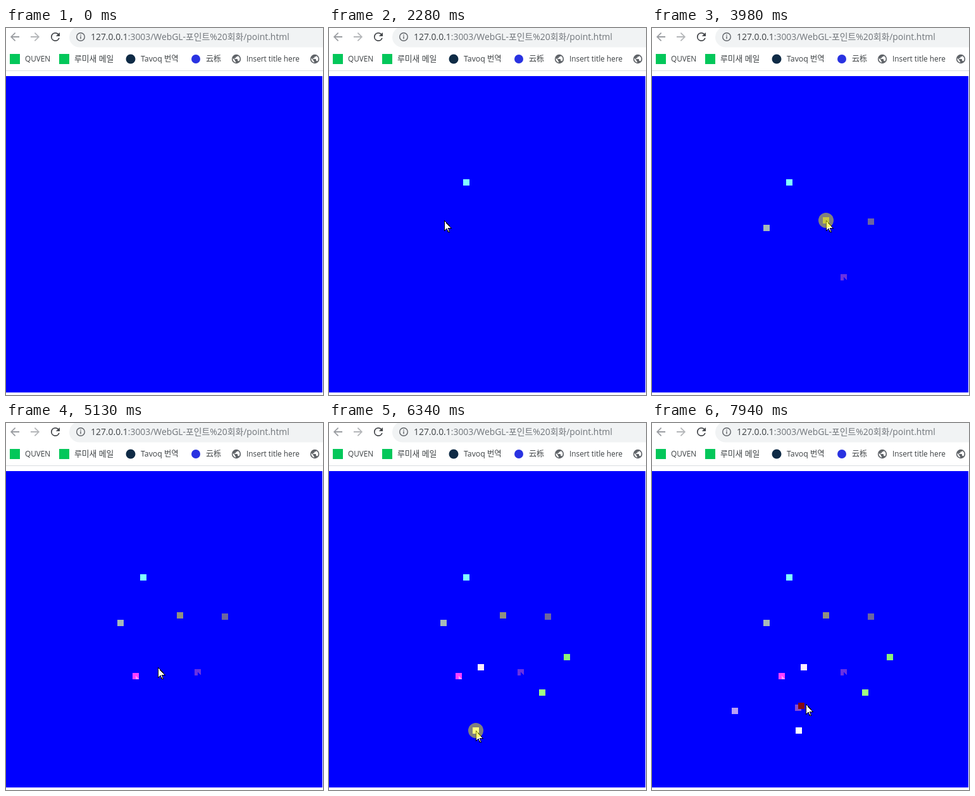
An HTML page for the animation above (8 s loop, 501x580 px).

```html
<!DOCTYPE html>
<html lang="ko">
<head>
<meta charset="utf-8">
<title>WebGL points</title>
<style>
  html, body { margin: 0; width: 100%; height: 100%; overflow: hidden; background: #fff; }
  svg { display: block; }
  text { font-family: "Open Sans", "Noto Sans CJK KR", "Noto Sans CJK", "Noto Sans CJK SC", sans-serif; font-size: 11.8px; fill: #3c4043; }
  .url { font-size: 13.9px; fill: #70757a; }
  .host { fill: #3c4043; }
  .icon { fill: #5f6368; }
  .pixels { shape-rendering: crispEdges; }
</style>
</head>
<body>
<svg width="501" height="580" viewBox="0 0 501 580">
  <defs>
    <path id="arrow" d="M20 11H7.83l5.59-5.59L12 4l-8 8 8 8 1.41-1.41L7.83 13H20z"/>
    <g id="globe">
      <circle class="icon" r="7.2"/>
      <path fill="#fff" d="M-5.4-1.4-2.2 1.800v.8q.2 1.200 1.400 1.400v1.500A5.600 5.600 0 0 1-5.400-1.400zM-2.800-1.400h1.500q.7 0 .7-.7v-1.400H.8Q2-3.600 2.100-5q3.400 1.600 3.400 5 0 2.300-1.500 3.800-.4-1-1.300-1H2V.7Q2 0 1.300 0h-4.100z"/>
    </g>
  </defs>

  <path fill="#f1f3f4" d="M501 0H108Q100 6 100 14.500A16 16 0 0 0 116 30.500H501z"/>
  <use href="#arrow" fill="#9a9da1" transform="translate(3.440 3.440) scale(.88)"/>
  <use href="#arrow" fill="#b4b6b9" transform="translate(56.560 3.440) scale(-.88 .88)"/>
  <path fill="#45484c" transform="translate(67.440 3.440) scale(.88)" d="M17.650 6.350A8 8 0 0 0 12 4a8 8 0 1 0 7.730 10h-2.080A6 6 0 1 1 12 6c1.660 0 3.140.690 4.220 1.780L13 11h7V4z"/>
  <circle cx="118" cy="14" r="6.300" fill="none" stroke="#5f6368" stroke-width="1.400"/>
  <path class="icon" d="M117.300 13h1.400v4.200h-1.400zM117.300 10.500h1.400v1.400h-1.400z"/>
  <text class="url" x="134" y="19"><tspan class="host">127.0.0.1</tspan>:3003/WebGL-포인트%20회화/point.html</text>

  <path fill="#03c75a" d="M6 41h16v16H6zM84 41h16v16H84z"/>
  <circle cx="197" cy="49" r="7.500" fill="#0f2b46"/>
  <circle cx="300" cy="49" r="7" fill="#2932e1"/>
  <use href="#globe" x="364" y="49"/>
  <use href="#globe" x="488" y="49"/>
  <text x="30" y="53">QUVEN</text>
  <text x="108" y="53" style="font-size:12.8px">루미새 메일</text>
  <text x="213" y="53" style="font-size:12.3px">Tavoq 번역</text>
  <text x="316" y="53" style="font-size:12px">云栎</text>
  <text x="380" y="53">Insert title here</text>
  <path fill="#dadce0" d="M0 67h501v1H0z"/>

  <path fill="#00f" d="M0 76h500v500H0z"/>
  <g id="points" class="pixels"></g>
  <path id="cursor" class="pixels" fill="#fff" stroke="#000" d="M.5.5v16l3.500-3.500 2.500 5.500h2l-2-6h5z"/>
  <circle id="ring" r="12" fill="#ff0" fill-opacity=".5"/>
</svg>
<script>
const LOOP = 8000;
const STEP = 66;       // time between drawn cursor positions
const MAX_STEPS = 5;   // longest glide
const HOLD = 200;      // how long the button stays down

// Each stop is glided to and clicked; the glide starts at the last release unless `leave` is later.
const stops = [
  { x: 217, y: 244, leave: 390, press: 1610, fill: '#80ffff' },
  { x: 181, y: 316, leave: 2140, press: 2480, fill: '#a5b9b9' },
  { x: 346, y: 306, press: 3010, fill: '#6c66a0' },
  { x: 303, y: 394, leave: 3300, press: 3500, fill: '#6932e1', corner: '#00f' },
  { x: 275, y: 304, press: 3980, fill: '#919180' },
  { x: 205, y: 400, press: 4460, fill: '#ff40ff', corner: '#ff98ff' },
  { x: 240, y: 386, leave: 4930, press: 5200, fill: '#ffebff' },
  { x: 337, y: 426, press: 5540, fill: '#a0ff82' },
  { x: 376, y: 370, press: 5870, fill: '#8cf078' },
  { x: 232, y: 486, press: 6340, fill: '#fff' },
  { x: 131, y: 455, press: 6740, fill: '#b9a0f5' },
  { x: 231, y: 450, press: 7070, fill: '#874bd2' },
  { x: 236, y: 447, leave: 7400, press: 7540, fill: '#820a14' },
  { x: 243, y: 444, leave: 7940, press: LOOP }
];
const entry = { x: 146, y: 525 };

const $ = id => document.getElementById(id);
const cursor = $('cursor'), ring = $('ring'), layer = $('points');
const show = (el, on) => el.setAttribute('visibility', on ? 'visible' : 'hidden');
const place = (el, { x, y }) => el.setAttribute('transform', `translate(${Math.round(x)} ${Math.round(y)})`);
const glide = (a, b, p, power) => b + (a - b) * (1 - p) ** power;

function add(parent, tag, attrs) {
  const el = document.createElementNS('http://www.w3.org/2000/svg', tag);
  for (const key in attrs) el.setAttribute(key, attrs[key]);
  return parent.appendChild(el);
}

stops.forEach((stop, i) => {
  stop.leave ??= stops[i - 1].press + HOLD;
  stop.steps = Math.min(MAX_STEPS, Math.max(1, Math.round((stop.press - stop.leave) / STEP)));
  stop.point = add(layer, 'g', {});
  if (stop.fill) add(stop.point, 'path', { d: 'M-5-5H5V5H-5z', fill: stop.fill });
  if (stop.corner) add(stop.point, 'path', { d: 'M0 0 5 5H0z', fill: stop.corner });
  place(stop.point, stop);
});

// The cursor slows down into each stop, sideways sooner than up or down.
function cursorAt(t) {
  let i = stops.length - 1;
  while (i > 0 && t < stops[i].leave) i--;
  const from = stops[i - 1] || entry, to = stops[i];
  const p = Math.min(1, (Math.floor((t - to.leave) / STEP) + 1) / to.steps);
  return { x: glide(from.x, to.x, p, 4), y: glide(from.y, to.y, p, 2) };
}

function draw(t) {
  const spot = cursorAt(t);
  place(cursor, spot);
  place(ring, spot);
  show(cursor, t >= stops[0].leave);
  show(ring, stops.some(({ press }) => t >= press && t < press + HOLD));
  stops.forEach(({ point, press }) => show(point, t >= press));
}

const began = performance.now();
function tick() {
  draw((performance.now() - began) % LOOP);
  requestAnimationFrame(tick);
}
draw(0);
requestAnimationFrame(tick);
</script>
</body>
</html>
```
